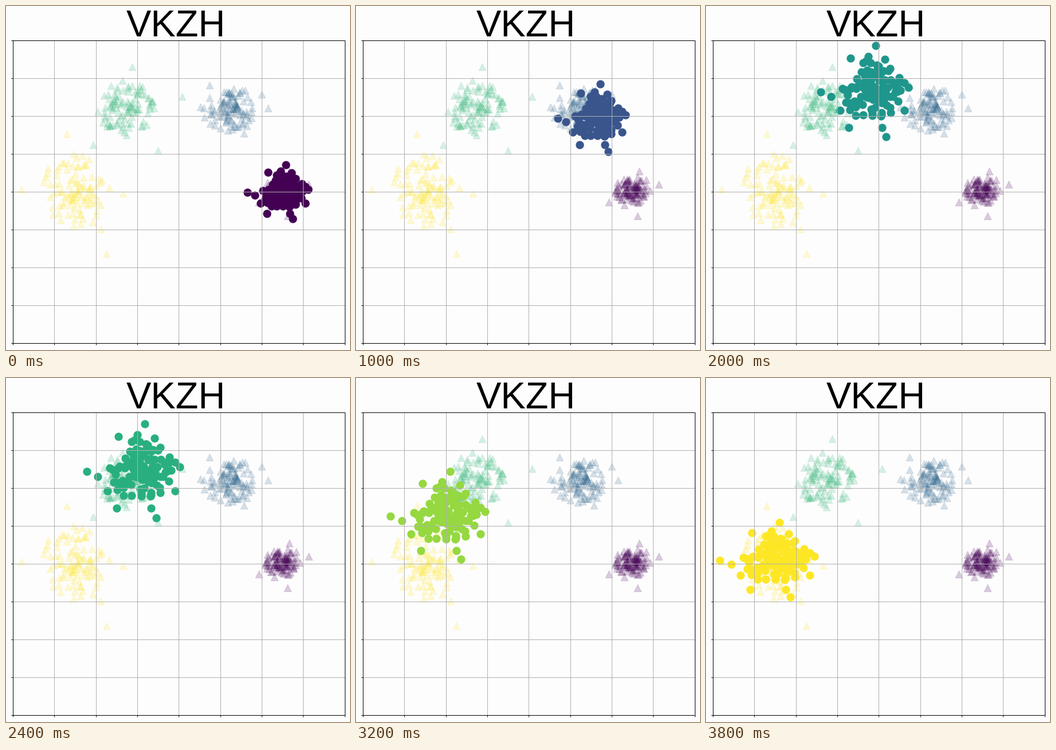
A matplotlib script that plays this animation: 600 by 600 pixels, repeating every 4000 ms.

```python
import numpy as np
import matplotlib.pyplot as plt
from matplotlib.animation import FuncAnimation

SIZE, DPI = 600, 72          # at 72 dpi one point is one pixel
FRAMES, STEP = 20, 200
LEFT, RIGHT, TOP, BOTTOM = 11.8, 590.8, 60, 588
PAPER = "#fefdfe"
MARK, EDGE = 13, 1.25

rng = np.random.default_rng(11)
viridis = plt.get_cmap("viridis")


def core(n, limit=2.2):
    """Gaussian points; those that lie too far out are pulled inside."""
    z = rng.normal(size=(n, 2))
    r = np.hypot(z[:, 0], z[:, 1])[:, None]
    return z * np.minimum(1, limit * rng.uniform(0.7, 1, r.shape) / r)


def target(centre, spread, outer):
    return np.vstack([centre + core(100) * spread, outer])


targets = [
    target((480, 321), (16, 13), [(528, 311), (491, 366), (441, 342),
                                  (494, 288)]),
    target((391, 180), (22, 19), [(355, 138), (446, 154), (457, 178),
                                  (339, 176), (415, 222)]),
    target((208, 178), (25, 22), [(220, 106), (307, 158), (152, 242),
                                  (265, 252)]),
    target((121, 321), (28, 30), [(27, 320), (106, 223), (175, 432),
                                  (204, 327), (165, 389)]),
]

# Particle offsets in units of the spread: a core and the outermost ones.
rim = [(-3.5, 0), (0.2, -3), (-1.5, -2.2), (0.8, -2.1), (-0.3, -2.3),
       (2.4, -0.3), (2.1, -0.6), (2.1, 1.2), (0.9, 2.9), (0.6, 2.3),
       (-1.6, 2.3), (-2.8, 0.3), (-2.2, 1.2), (1.7, 0.6)]
offsets = np.vstack([0.95 * core(100), rim])

# Time, centre x and y, spread x and y of the swarm.
keys = np.array([
    (0, 484, 325, 18, 16),
    (5, 422, 196, 20, 20),
    (7, 373, 168, 21, 21),
    (10, 291, 150, 26, 27),
    (14, 190, 194, 28, 27),
    (17, 145, 267, 28, 25),
    (19, 122, 318, 28, 22)], float)
times, poses = keys[:, 0], keys[:, 1:]
slopes = np.gradient(poses, times, axis=0, edge_order=2)


def swarm(t):
    """Cubic Hermite path of the centre and spread through the keys."""
    k = min(np.searchsorted(times, t, side="right") - 1, len(times) - 2)
    h = times[k + 1] - times[k]
    s = (t - times[k]) / h
    ease = s * s * (3 - 2 * s)
    pose = (poses[k] * (1 - ease) + poses[k + 1] * ease
            + h * s * (1 - s) ** 2 * slopes[k]
            - h * s * s * (1 - s) * slopes[k + 1])
    return pose[:2] + offsets * pose[2:]


fig = plt.figure(figsize=(SIZE / DPI, SIZE / DPI), dpi=DPI, facecolor=PAPER)
ax = fig.add_axes([LEFT / SIZE, 1 - BOTTOM / SIZE,
                   (RIGHT - LEFT) / SIZE, (BOTTOM - TOP) / SIZE],
                  facecolor=PAPER)
ax.set(xlim=(LEFT, RIGHT), ylim=(BOTTOM, TOP),
       xticks=np.linspace(LEFT, RIGHT, 9), yticks=np.linspace(TOP, BOTTOM, 9))
ax.tick_params(length=3, width=1, labelbottom=False, labelleft=False)
ax.grid(color="#b0b0b0", linewidth=1)
ax.set_axisbelow("line")
for spine in ax.spines.values():
    spine.set_linewidth(1)
fig.text(296.5 / SIZE, 1 - 53 / SIZE, "VKZH", family="Liberation Sans",
         size=65, color="black", ha="center", va="baseline")

for i, pts in enumerate(targets):
    ax.scatter(*pts.T, s=MARK ** 2, marker="^", color=viridis(i / 3),
               alpha=0.2, linewidths=EDGE / 2)
dots = ax.scatter(*swarm(0).T, s=MARK ** 2, color=viridis(0.0),
                  linewidths=EDGE)


def draw(n):
    dots.set_offsets(swarm(n))
    dots.set_color(viridis(n / (FRAMES - 1)))
    return dots,


anim = FuncAnimation(fig, draw, frames=FRAMES, interval=STEP,
                     repeat=True, repeat_delay=0, blit=False)
plt.show()
```
